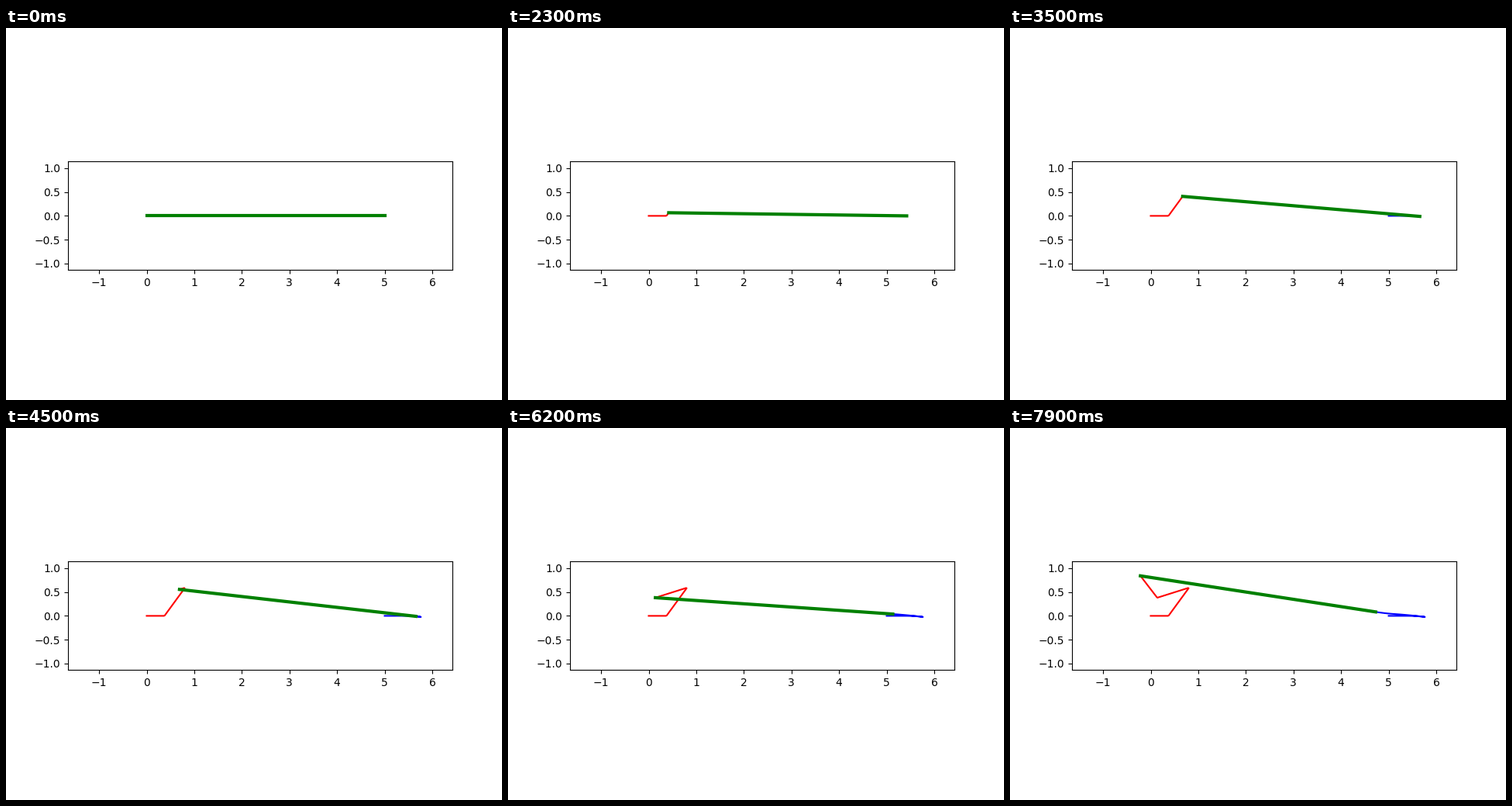
Animation of 640 by 480 pixels, one loop 8000 ms. Source, as a matplotlib script:

```python
import numpy as np
import matplotlib.pyplot as plt
from matplotlib.animation import FuncAnimation

FRAMES = 80
LENGTH = 5.0
PHASE = 20.7   # frames per leg
SUB = 20       # integration steps per frame

# velocity of the driven end on each leg, units per frame
LEGS = np.array([
    (0.018057, 0.0),
    (0.0209, 0.0286),
    (-0.0323, -0.0102),
    (-0.0209, 0.0272),
])


def simulate():
    """Drive one end of the rod; the other only rolls along the rod."""
    pos, theta = np.zeros(2), 0.0
    head, tail = [], []
    for step in range(FRAMES * SUB):
        if step % SUB == 0:
            head.append(pos.copy())
            tail.append(pos + LENGTH * np.array([np.cos(theta), np.sin(theta)]))
        leg = min(int(step / SUB / PHASE), len(LEGS) - 1)
        vx, vy = LEGS[leg] / SUB
        theta -= (vy * np.cos(theta) - vx * np.sin(theta)) / LENGTH
        pos = pos + (vx, vy)
    return np.array(head), np.array(tail)


head, tail = simulate()

fig, ax = plt.subplots(figsize=(6.4, 4.8), dpi=100)
ax.set_aspect("equal")
ax.set_xlim(-1.6529, 6.4239)
ax.set_ylim(-1.14, 1.14)

head_trace, = ax.plot([], [], color="red", lw=1.5)
tail_trace, = ax.plot([], [], color="blue", lw=1.5)
rod, = ax.plot([], [], color="green", lw=3)


def update(i):
    head_trace.set_data(*head[:i + 1].T)
    tail_trace.set_data(*tail[:i + 1].T)
    rod.set_data(*np.array([head[i], tail[i]]).T)
    return head_trace, tail_trace, rod


anim = FuncAnimation(fig, update, frames=FRAMES, interval=100, repeat=True)
plt.show()
```
